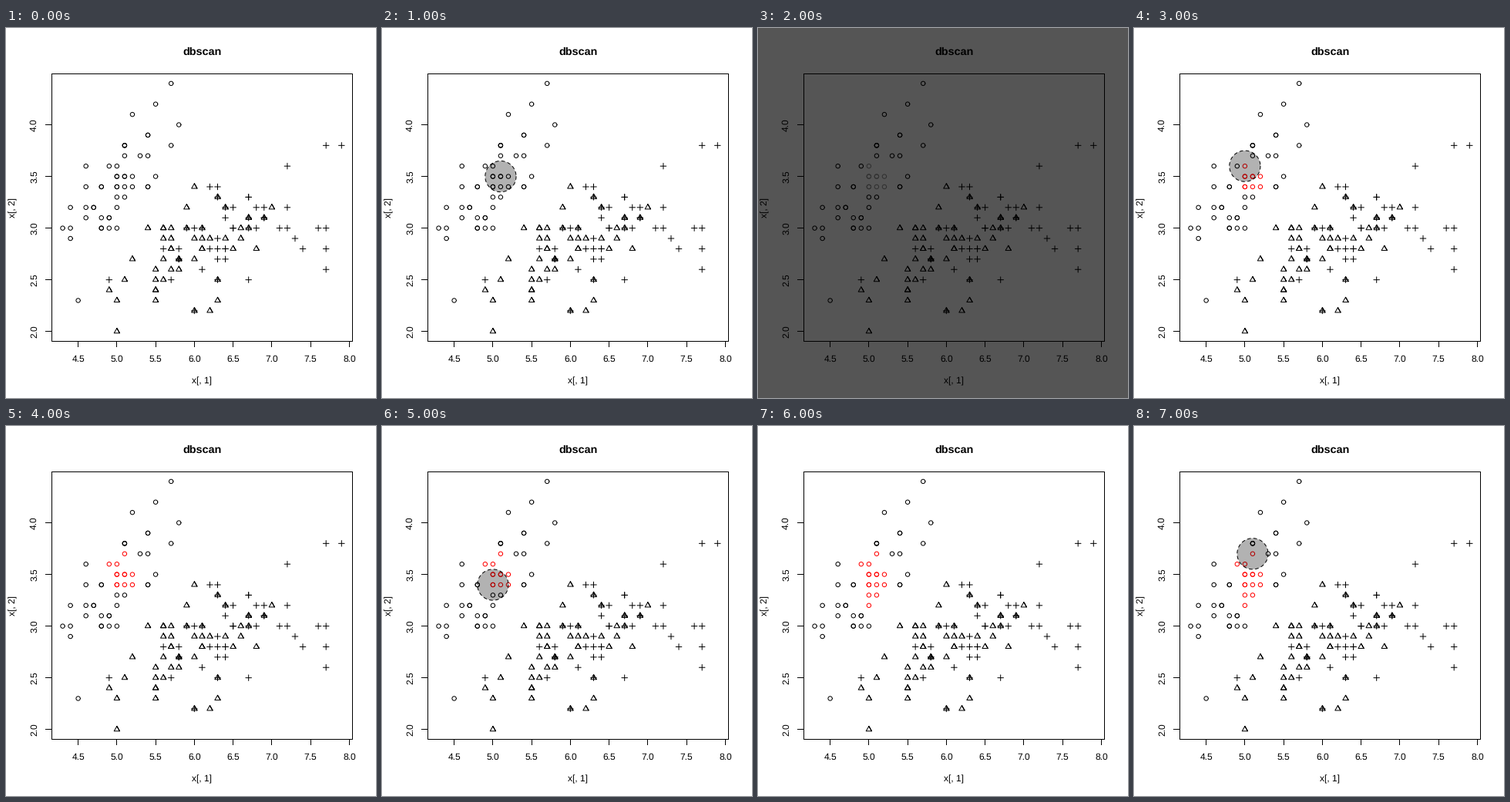
A matplotlib script that plays this animation: 480x480 px, repeating every 8 s.

```python
import numpy as np
import matplotlib.pyplot as plt
from matplotlib.animation import FuncAnimation
from matplotlib.collections import LineCollection
from matplotlib.patches import Polygon, Rectangle

SIZE, DPI = 480, 80
PX = 72 / DPI                      # one pixel in points
LEFT, RIGHT, TOP, BOTTOM = 59.04, 449.76, 59.04, 406.56
X0, X1, Y0, Y1 = 4.156, 8.044, 1.904, 4.496
EPS = 0.2
CENTRES = [(5.1, 3.5), (5.0, 3.6), (5.0, 3.4), (5.1, 3.7)]
DIM_STEP = 2

# y value -> x values, both in tenths
CIRCLES = {
    44: [57], 42: [55], 41: [52], 40: [58], 39: [54, 54],
    38: [57, 51, 51, 51], 37: [54, 51, 53], 36: [50, 46, 49],
    35: [51, 51, 52, 55, 50, 50],
    34: [46, 50, 48, 54, 48, 50, 52, 54, 51],
    33: [51, 50], 32: [47, 47, 50, 44, 46], 31: [46, 49, 48, 49],
    30: [49, 48, 43, 50, 44, 48], 29: [44], 23: [45],
}
TRIANGLES = {
    34: [60], 33: [63], 32: [70, 64, 59], 31: [69, 67, 67],
    30: [59, 56, 66, 67, 54, 56, 61, 57],
    29: [66, 61, 56, 64, 60, 57, 62], 28: [65, 57, 61, 61, 68, 57],
    27: [52, 58, 58, 60, 56], 26: [57, 55, 58], 25: [56, 63, 55, 51],
    24: [49, 55, 55], 23: [55, 63, 50], 22: [60, 62], 20: [50],
}
PLUSES = {
    38: [77, 79], 36: [72], 34: [63, 62], 33: [63, 67, 67],
    32: [65, 64, 69, 72, 68], 31: [64, 69, 67, 69],
    30: [71, 65, 76, 68, 65, 61, 72, 77, 60, 67, 65, 59],
    29: [63, 73], 28: [58, 56, 77, 62, 64, 74, 64, 63],
    27: [58, 64, 63, 58], 26: [77, 61], 25: [49, 67, 57, 63], 22: [60],
}

plt.rcParams.update({"font.family": "Liberation Sans", "text.hinting": "none"})


def px(x):
    return LEFT + (x - X0) / (X1 - X0) * (RIGHT - LEFT)


def py(y):
    return BOTTOM - (y - Y0) / (Y1 - Y0) * (BOTTOM - TOP)


def points(rows):
    return np.array([(x / 10, y / 10) for y, xs in rows.items() for x in xs])


def ring(radius, count):
    a = np.linspace(0, 2 * np.pi, count)
    return radius * np.column_stack([np.cos(a), np.sin(a)])


def marks(pts, *strokes):
    """Draw the given strokes around every point."""
    segs = [s + (px(x), py(y)) for s in map(np.array, strokes) for x, y in pts]
    lines = LineCollection(segs, colors="black", linewidths=PX, zorder=2,
                           capstyle="round", joinstyle="round")
    lines.set_snap(False)
    return ax.add_collection(lines)


def line(xs, ys):
    ax.plot(np.floor(xs) + 0.5, np.floor(ys) + 0.5, color="black", lw=PX,
            solid_capstyle="projecting", zorder=3, snap=False)


def label(x, y, s, size=12, **kw):
    ax.text(x, y, s, fontsize=size * PX, ha="center", va="baseline", **kw)


def side_label(x, y, s):
    ax.text(x, y, s, fontsize=12 * PX, rotation=90, ha="right", va="center",
            rotation_mode="default")


fig = plt.figure(figsize=(SIZE / DPI, SIZE / DPI), dpi=DPI)
ax = fig.add_axes([0, 0, 1, 1])
ax.set(xlim=(0, SIZE), ylim=(SIZE, 0))
ax.axis("off")
back = ax.add_patch(Rectangle((-2, -2), SIZE + 4, SIZE + 4, fc="white", lw=0, zorder=0))

# frame, axes and labels
line([LEFT, RIGHT, RIGHT, LEFT, LEFT], [TOP, TOP, BOTTOM, BOTTOM, TOP])
for v in np.arange(4.5, 8.1, 0.5):
    line([px(v)] * 2, [BOTTOM, BOTTOM + 7.2])
    label(px(v), 433, f"{v:.1f}")
for v in np.arange(2, 4.1, 0.5):
    line([LEFT - 7.2, LEFT], [py(v)] * 2)
    side_label(42.5, py(v), f"{v:.1f}")
label((LEFT + RIGHT) / 2, 35, "dbscan", 14.4, weight="bold")
label((LEFT + RIGHT) / 2, 462, "x[, 1]")
side_label(15.5, (TOP + BOTTOM) / 2, "x[, 2]")

# data
R = 2.7
pts = points(CIRCLES)
dots = marks(pts, ring(R, 33))
top, base, half = 1.5546 * R, 0.7773 * R, 1.3464 * R
marks(points(TRIANGLES),
      [(0, -top), (half, base), (-half, base), (0, -top), (half, base)])
arm = np.sqrt(2) * R
marks(points(PLUSES), [(-arm, 0), (arm, 0)], [(0, -arm), (0, arm)])

reach = EPS * (RIGHT - LEFT) / (X1 - X0)
probe = ax.add_patch(Polygon(ring(reach, 121), closed=False, fc=(0, 0, 0, 0.3),
                             ec="black", lw=PX, ls=(0, (4, 4)),
                             capstyle="round", zorder=4))


def update(step):
    dim = step == DIM_STEP
    back.set_facecolor("#555555" if dim else "white")

    # points reached by the finished probes
    hit = np.zeros(len(pts), bool)
    for c in CENTRES[:step // 2]:
        hit |= np.hypot(*(pts - c).T) <= EPS
    found = "#303030" if dim else "red"
    dots.set_color([found if h else "black" for h in hit])

    probe.set_visible(step % 2 == 1)
    x, y = CENTRES[step // 2]
    probe.set_xy(ring(reach, 121) + (px(x), py(y)))
    return back, dots, probe


anim = FuncAnimation(fig, update, frames=8, interval=1000, repeat=True,
                     repeat_delay=0, blit=False)
plt.show()
```
